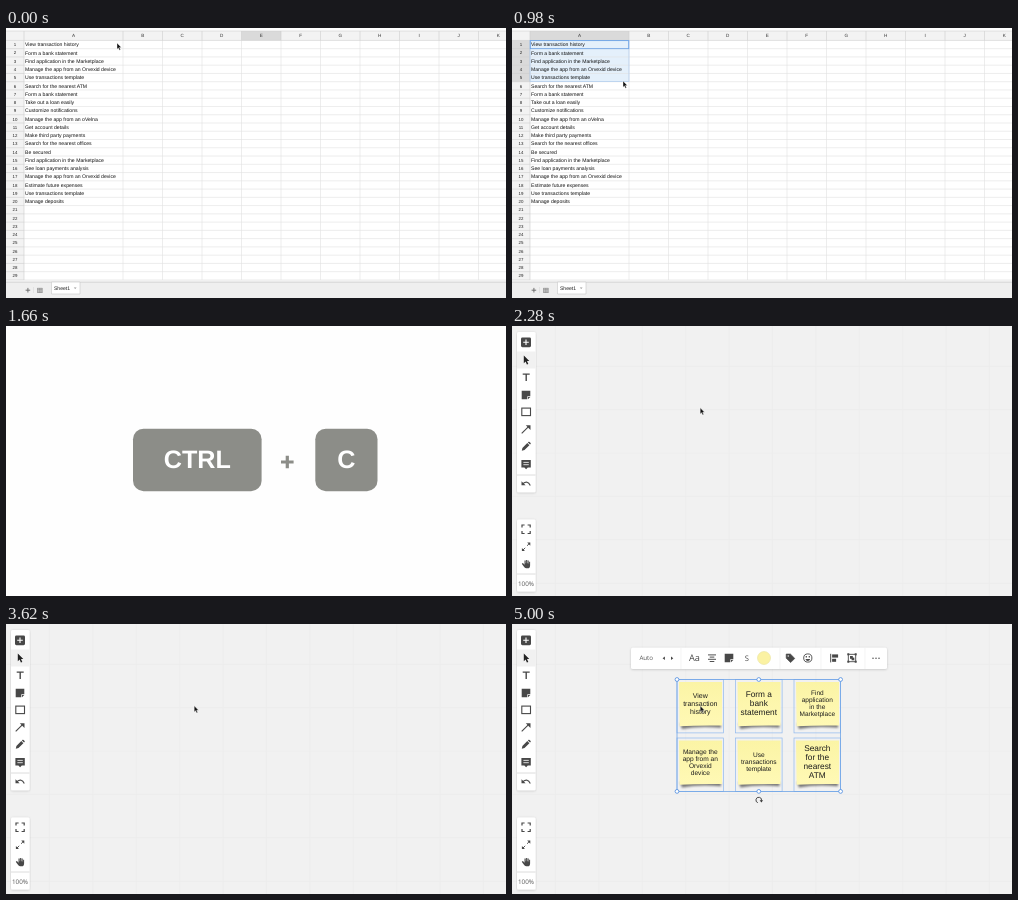
Write an HTML page that moves like this. It is 500 by 270 pixels and loops after 5020 ms.

```html
<!DOCTYPE html>
<html lang="en">
<head>
<meta charset="utf-8">
<title>Copy rows to sticky notes</title>
<style>
  html, body { margin: 0; width: 100%; height: 100%; overflow: hidden; background: #fff; }
  svg { display: block; width: 100%; height: 100%; }
  text { font-family: "Liberation Sans", Arial, sans-serif; text-rendering: geometricPrecision; }
  .ui { font-family: "Open Sans", sans-serif; }
</style>
</head>
<body>
<svg id="stage" viewBox="0 0 500 270" preserveAspectRatio="none">
  <defs>
    <linearGradient id="paper" x1="0" y1="0" x2="0" y2="1">
      <stop offset="0" stop-color="#fbf4a5"/>
      <stop offset="1" stop-color="#fff9b5"/>
    </linearGradient>
    <filter id="soft" x="-20%" y="-100%" width="140%" height="300%"><feGaussianBlur stdDeviation="0.9"/></filter>
    <filter id="lift" x="-5%" y="-30%" width="110%" height="170%">
      <feDropShadow dx="0" dy="0.6" stdDeviation="1" flood-opacity="0.2"/>
    </filter>
  </defs>
</svg>
<script>
const LOOP = 5020;
const INK = '#484848';
const BLUE = '#6fa4e6';
const stage = document.getElementById('stage');

function add(parent, tag, attrs, content) {
  const el = document.createElementNS('http://www.w3.org/2000/svg', tag);
  for (const key in attrs) el.setAttribute(key, attrs[key]);
  if (content !== undefined) el.textContent = content;
  parent.appendChild(el);
  return el;
}
const group = (parent, attrs = {}) => add(parent, 'g', attrs);
const rect = (p, x, y, width, height, fill, more) =>
  add(p, 'rect', { x, y, width, height, fill, ...more });
const path = (p, d, fill, more) => add(p, 'path', { d, fill, ...more });
const stroke = (p, d, color = INK, width = 1, more) =>
  path(p, d, 'none', { stroke: color, 'stroke-width': width, ...more });
const label = (p, x, y, size, str, more) =>
  add(p, 'text', { x, y, 'font-size': size, fill: '#222', 'text-anchor': 'middle', ...more }, str);

function pointer(parent, x, y) {
  return path(parent, 'M0 0V6.2L1.4 4.9L2.4 7.2L3.5 6.7L2.5 4.5H4.4Z', '#111', {
    stroke: '#fff', 'stroke-width': 0.4, transform: `translate(${x} ${y})`
  });
}

// Spreadsheet
const TOP = 12.4, ROW = 8.26, LEFT = 18, EDGE = 117, COL = 39.5;
const rowTop = r => TOP + ROW * r;
const items = [
  'View transaction history', 'Form a bank statement', 'Find application in the Marketplace',
  'Manage the app from an Orvexid device', 'Use transactions template',
  'Search for the nearest ATM', 'Form a bank statement', 'Take out a loan easily',
  'Customize notifications', 'Manage the app from an oVelna', 'Get account details',
  'Make third party payments', 'Search for the nearest offices', 'Be secured',
  'Find application in the Marketplace', 'See loan payments analysis',
  'Manage the app from an Orvexid device', 'Estimate future expenses',
  'Use transactions template', 'Manage deposits'
];

function buildSheet() {
  const g = group(stage);
  rect(g, 0, 0, 500, 270, '#fff');
  rect(g, 0, 3, 500, TOP - 3, '#f3f3f3');
  rect(g, 0, TOP, LEFT, 240, '#f3f3f3');
  const headE = rect(g, EDGE + 3 * COL, 3, COL, TOP - 3, '#dadada');
  const headA = rect(g, LEFT, 3, EDGE - LEFT, TOP - 3, '#dadada');
  const rowHead = rect(g, 0, TOP, LEFT, ROW, '#dadada');
  const fill = rect(g, LEFT, TOP, EDGE - LEFT, ROW, '#e4f0fb');

  let lines = '', heads = `M0 3H500M0 ${TOP}H500M${LEFT} 3V252`;
  for (let r = 1; r <= 29; r++) {
    lines += `M${LEFT} ${rowTop(r)}H500`;
    heads += `M0 ${rowTop(r)}H${LEFT}`;
  }
  for (let x = EDGE; x < 500; x += COL) {
    lines += `M${x} ${TOP}V252`;
    heads += `M${x} 3V${TOP}`;
  }
  stroke(g, lines, '#e1e1e1', 0.6);
  stroke(g, heads, '#cecece', 0.6);

  [...'ABCDEFGHIJK'].forEach((c, i) =>
    label(g, i ? EDGE + COL * (i - 0.5) : 67.5, 9.3, 4.6, c, { fill: '#333' }));
  for (let r = 0; r < 29; r++) {
    label(g, 9, rowTop(r) + 5.8, 4.4, r + 1, { fill: '#222' });
    if (items[r]) label(g, 19, rowTop(r) + 5.9, 5.12, items[r], { 'text-anchor': 'start', fill: '#111' });
  }
  const range = rect(g, LEFT, TOP, EDGE - LEFT, ROW, 'none', { stroke: '#a3c6f0', 'stroke-width': 0.6 });
  const active = rect(g, LEFT + 0.3, TOP + 0.2, EDGE - LEFT - 0.6, ROW - 0.2, 'none', { stroke: BLUE, 'stroke-width': 0.9 });

  rect(g, 0, 252.3, 500, 18, '#efefef');
  stroke(g, 'M0 254.3H500', '#d2d2d2', 0.7);
  path(g, 'M45.5 254V266H74V254Z', '#fff', { stroke: '#c8c8c8', 'stroke-width': 0.6 });
  label(g, 56, 262.1, 5.12, 'Sheet1');
  path(g, 'M67.8 259.5H70.6L69.2 261.1Z', '#999');
  stroke(g, 'M19.6 262.2H24.2M21.9 259.9V264.5', '#666', 0.9);
  stroke(g, 'M27.5 259V265', '#d8d8d8', 0.6);
  stroke(g, 'M31.4 260.3H36.4M31.4 261.7H36.4M31.4 263.1H36.4M31.4 264.5H36.4M31.7 260V264.8M36.1 260V264.8M33.9 260V264.8', '#777', 0.6);

  const arrow = pointer(g, 111, 15);
  // Time and height of the pointer while it drags
  const drag = [[580, 15], [980, 53], [1100, 57]];

  function update(t) {
    let y = drag[0][1];
    for (let i = 1; i < drag.length; i++) {
      const [t0, y0] = drag[i - 1], [t1, y1] = drag[i];
      if (t >= t0) y = y0 + (y1 - y0) * Math.min(1, (t - t0) / (t1 - t0));
    }
    arrow.setAttribute('transform', `translate(111 ${y})`);
    const picked = t >= 300;
    const count = Math.floor((y - TOP) / ROW) + 1;
    for (const el of [rowHead, fill, range]) el.setAttribute('height', count * ROW);
    for (const el of [headA, rowHead, range, active]) show(el, picked);
    show(fill, count > 1);
    show(headE, !picked);
  }
  return { g, update };
}

// Key caps
function buildKeys(letter) {
  const g = group(stage);
  rect(g, 0, 0, 500, 270, '#fefefe');
  const cap = (x, width, str) => {
    rect(g, x, 102.7, width, 62.5, '#8c8d88', { rx: 10.5 });
    label(g, x + width / 2, 142, 25.2, str, { fill: '#fff', 'font-weight': 'bold' });
  };
  cap(127, 128.6, 'CTRL');
  cap(309.3, 62.2, letter);
  stroke(g, 'M275 136H287.6M281.3 129.7V142.3', '#8c8d88', 3.2);
  return g;
}

// Board
function stickyIcon(p, x, y) {
  path(p, `M${x - 4.3} ${y - 4.3}H${x + 4.3}V${y + 1.3}H${x + 1.3}V${y + 4.3}H${x - 4.3}Z`, INK);
  path(p, `M${x + 2} ${y + 4.3}V${y + 2}H${x + 4.3}Z`, INK);
}

function buildTools(g) {
  const panel = (y, h) => rect(g, 5, y, 18.6, h, '#fff', { rx: 1.5, filter: 'url(#lift)' });
  panel(6, 160.3);
  panel(193.5, 72);
  rect(g, 5, 25.5, 18.6, 17, '#f1f1f1');
  stroke(g, 'M5 149H23.6M5 248H23.6', '#dcdcdc', 1);

  rect(g, 9, 11.4, 10, 9.8, INK, { rx: 1.4 });
  stroke(g, 'M11.2 16.3H16.8M14 13.5V19.1', '#fff', 1.1);
  path(g, 'M11.8 29.4V37.2L13.6 35.6L14.9 38.6L16.3 38L15 35.1H17.3Z', '#222');
  stroke(g, 'M10.7 48.1H17.7M14.2 47.6V55', INK, 1.4);
  stickyIcon(g, 14, 69);
  rect(g, 9.8, 82.1, 8.7, 7.5, 'none', { stroke: INK, 'stroke-width': 1.1 });
  stroke(g, 'M9.7 107.3L16.3 100.9', INK, 1.1);
  path(g, 'M13.8 99.2H18.5V103.9Z', INK);
  path(g, 'M9.8 124.7L10.4 122L15.3 117.1L17.4 119.2L12.5 124.1ZM15.9 116.5L16.6 115.8Q17.1 115.5 17.6 115.9L18.6 116.9Q19 117.4 18.6 117.9L18 118.6Z', INK);
  path(g, 'M9.4 134H18.8V141.4H15.8L14.1 143.3L12.4 141.4H9.4Z', INK);
  stroke(g, 'M11.4 136.4H16.8M11.4 138.7H16.8', '#fff', 0.8);
  stroke(g, 'M10.8 157.7Q15.6 153.8 18.3 159.4', INK, 1.1);
  path(g, 'M9.5 155.2V159.3H13.6Z', INK);
  stroke(g, 'M10 201.5V199H12.6M15.6 199H18.2V201.5M18.2 205V207.5H15.6M12.6 207.5H10V205', INK, 1.2);
  stroke(g, 'M11 224L13.2 221.8M15 219.8L17.3 217.6', INK, 0.9);
  path(g, 'M15.2 216.6H18.3V219.7ZM9.9 222V225.1H13Z', INK);
  path(g, 'M11.9 237.7L9.9 236.9Q9.6 238.1 11.2 239.7L12.6 241.5Q13.2 242.3 14.3 242.3H15.6Q18 242.2 18.1 239.4V235.7H17.1V237.6H16.7V234.6H15.6V237.3H15.2V234H14.1V237.3H13.7V234.5H12.5V239Z', INK);
  label(g, 14, 259.7, 6.3, '100%', { class: 'ui', fill: '#555' });
}

function buildMenu(g) {
  rect(g, 119, 23.7, 256, 21.3, '#fff', { rx: 1.8, filter: 'url(#lift)' });
  stroke(g, 'M169 24V45M268 24V45M309 24V45M353 24V45', '#f0f0f0', 0.7);
  label(g, 134.2, 36.4, 6.2, 'Auto', { class: 'ui', fill: '#555' });
  path(g, 'M152.9 32.4V36L150.6 34.2ZM159 32.4V36L161.3 34.2Z', INK);
  label(g, 182.5, 37.3, 9.2, 'Aa', { class: 'ui', fill: INK });
  stroke(g, 'M196 30.9H204M197.7 33.1H202.3M196 35.3H204M197.7 37.5H202.3', INK, 0.95);
  stickyIcon(g, 217, 34);
  label(g, 234.8, 36.8, 7.6, 'S', { class: 'ui', fill: INK });
  add(g, 'circle', { cx: 252, cy: 34, r: 6.5, fill: '#fbf2a3', stroke: '#e9e2a0', 'stroke-width': 0.6 });
  path(g, 'M274.2 30H278.4L282.8 34.4L278.6 38.6L274.2 34.2Z', INK, { 'stroke-linejoin': 'round', stroke: INK, 'stroke-width': 0.6 });
  add(g, 'circle', { cx: 276.2, cy: 32, r: 0.7, fill: '#fff' });
  add(g, 'circle', { cx: 295.8, cy: 34, r: 4.1, fill: 'none', stroke: INK, 'stroke-width': 0.9 });
  path(g, 'M293.4 35H298.2Q297.6 37 295.8 37T293.4 35ZM293.7 32.1H294.9V33.4H293.7ZM296.7 32.1H297.9V33.4H296.7Z', INK);
  stroke(g, 'M318.7 29.8V38.4', INK, 1);
  rect(g, 320.1, 30.4, 6, 3.2, INK);
  rect(g, 320.1, 34.8, 4, 3, INK);
  rect(g, 336.3, 30.3, 7.4, 7.4, 'none', { stroke: INK, 'stroke-width': 0.9 });
  for (const x of [336.3, 343.7]) for (const y of [30.3, 37.7]) rect(g, x - 1, y - 1, 2, 2, INK);
  rect(g, 338, 32, 2.8, 2.8, INK);
  rect(g, 339.6, 33.6, 2.7, 2.7, INK);
  for (const x of [361, 364, 367]) add(g, 'circle', { cx: x, cy: 34.2, r: 0.75, fill: INK });
}

// Font size, line height, lines
const notes = [
  [7, 7.8, 'View', 'transaction', 'history'],
  [8.3, 9, 'Form a', 'bank', 'statement'],
  [6.5, 7.2, 'Find', 'application', 'in the', 'Marketplace'],
  [6.6, 7.1, 'Manage the', 'app from an', 'Orvexid', 'device'],
  [6.6, 7, 'Use', 'transactions', 'template'],
  [8.3, 9, 'Search', 'for the', 'nearest', 'ATM']
];

function buildNotes(g) {
  notes.forEach(([size, step, ...lines], i) => {
    const x = 165 + 58.5 * (i % 3), y = i < 3 ? 55.5 : 114;
    path(g, `M${x + 3} ${y + 44}H${x + 44}V${y + 48.3}Q${x + 23} ${y + 46} ${x + 5} ${y + 49.5}Z`, '#000', { opacity: 0.5, filter: 'url(#soft)' });
    path(g, `M${x + 2} ${y + 2.4}H${x + 45}V${y + 46}Q${x + 20} ${y + 45.6} ${x + 2.6} ${y + 46.8}Z`, 'url(#paper)');
    const first = y + 23.9 - step * (lines.length - 1) / 2 + size * 0.35;
    lines.forEach((str, n) => label(g, x + 23.3, first + n * step, size, str, { fill: '#1c1c1c' }));
    rect(g, x, y, 46.6, 53.4, 'none', { stroke: '#8fb8ee', 'stroke-width': 0.7 });
  });
  rect(g, 165, 55.5, 163.6, 111.9, 'none', { stroke: BLUE, 'stroke-width': 0.8 });
  for (const cx of [165, 246.8, 328.6]) for (const cy of [55.5, 167.4])
    add(g, 'circle', { cx, cy, r: 1.9, fill: '#fff', stroke: '#4b8be0', 'stroke-width': 0.8 });
  stroke(g, 'M245.8 178.7A2.8 2.8 0 1 1 249.5 176.6', '#333', 0.9);
  path(g, 'M247.7 176.3H251.1L249.4 178.6Z', '#333');
}

function buildBoard() {
  const g = group(stage);
  rect(g, 0, 0, 500, 270, '#f1f1f1');
  let grid = '';
  for (let i = 0; i < 12; i++) grid += `M${43.4 * i} 0V270`;
  for (let i = 0; i < 6; i++) grid += `M0 ${40.2 + 43.4 * i}H500`;
  stroke(g, grid, '#ececec', 0.9);
  buildTools(g);
  const cards = group(g), menu = group(g);
  buildNotes(cards);
  buildMenu(menu);
  pointer(g, 188.2, 81.8);
  function update(t) {
    fade(cards, (t - 3840) / 120);
    fade(menu, (t - 3960) / 160);
  }
  return { g, update };
}

function show(el, on) { el.style.display = on ? '' : 'none'; }
function fade(el, k) {
  show(el, k >= 0);
  el.style.opacity = Math.max(0, Math.min(1, k));
}

const sheet = buildSheet();
const copyKeys = buildKeys('C');
const pasteKeys = buildKeys('V');
const board = buildBoard();

// Start time and scene
const cuts = [[0, sheet.g], [1660, copyKeys], [2280, board.g], [3000, pasteKeys], [3620, board.g]];

function draw(now) {
  const t = now % LOOP;
  let scene;
  for (const [start, g] of cuts) if (t >= start) scene = g;
  for (const [, g] of cuts) show(g, g === scene);
  sheet.update(t);
  board.update(t);
}

const begin = performance.now();
function tick() {
  draw(performance.now() - begin);
  requestAnimationFrame(tick);
}
tick();
</script>
</body>
</html>
```
